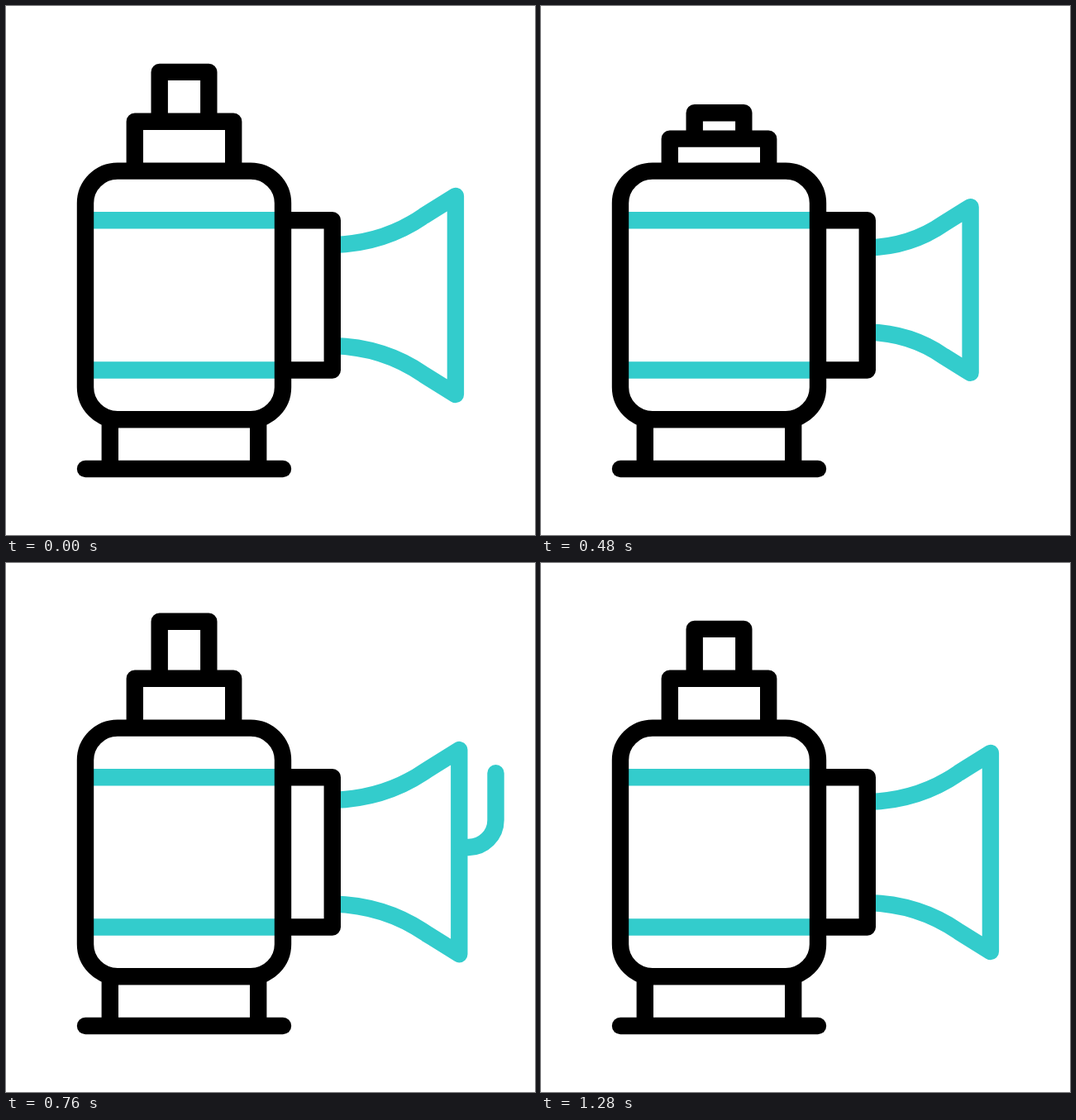
Write an HTML page that moves like this. It is 640x640 px and loops after 1480 ms.

```html
<!DOCTYPE html>
<html lang="en">
<head>
<meta charset="utf-8">
<title>Air horn</title>
<style>
  html, body { margin: 0; width: 100%; height: 100%; overflow: hidden; background: #fff; }
  svg { display: block; width: 100%; height: 100%; }
</style>
</head>
<body>
<svg viewBox="0 0 640 640" fill="none" stroke-width="20.4" stroke-linejoin="round">
  <g stroke="#33cccc">
    <path d="M96 259.2H335M96 440.5H335"/>
    <path id="horn" d="M0 -61C40 -62 77 -73 110 -96L148.5 -120V120L110 96C77 73 40 62 0 61"/>
    <path id="sound" stroke-linecap="round" d="M553 344H559.5A33 33 0 0 0 592.5 311V98A33 33 0 0 1 625.5 65H651"/>
  </g>
  <g stroke="#000">
    <path id="nozzle"/>
    <path id="collar"/>
    <rect x="96" y="199.6" width="239" height="300.6" rx="39"/>
    <path d="M335 259.2H394.8V440.5H335M125.8 500V560M305.2 500V560"/>
    <path stroke-linecap="round" d="M96 560H335"/>
  </g>
</svg>
<script>
const LOOP = 1480, STEP = 40, STROKE = 20.4;
const [horn, sound, nozzle, collar] =
  ['horn', 'sound', 'nozzle', 'collar'].map(id => document.getElementById(id));
const pathLength = sound.getTotalLength();

function ease(t, from, to) {
  const u = Math.min(1, Math.max(0, (t - from) / (to - from)));
  return u * u * (3 - 2 * u);
}

// Offset from rest: squeeze, spring past rest, settle.
function spring(t, squeeze, overshoot, settled) {
  return squeeze * ease(t, 80, 440)
    + (overshoot - squeeze) * ease(t, 440, 680)
    - overshoot * ease(t, 680, settled);
}

function draw(t) {
  const collarY = 139.8 + spring(t, 22.5, 0, 920);
  const nozzleY = 79.9 + spring(t, 55, -21.8, 824);
  collar.setAttribute('d', `M155.8 199V${collarY}H275.2V199`);
  nozzle.setAttribute('d', `M185.7 ${collarY}V${nozzleY}H245.3V${collarY}`);

  const scale = 1 + spring(t, -0.18, 0.04, 920);
  const hornY = 350 + spring(t, -7, -0.5, 920);
  horn.setAttribute('transform', `translate(395.4 ${hornY}) scale(${scale})`);
  horn.setAttribute('stroke-width', STROKE / scale);

  const head = Math.min(pathLength, 115 * (Math.max(0, t - 640) / 120) ** 1.075);
  const tail = pathLength * ease(t, 880, 1290);
  sound.style.display = t >= 640 && t < 1280 ? '' : 'none';
  sound.setAttribute('stroke-dasharray', `${Math.max(0.01, head - tail)} 999`);
  sound.setAttribute('stroke-dashoffset', -tail);
}

function tick() {
  const t = performance.now() % LOOP;
  draw(Math.floor(t / STEP) * STEP);
  requestAnimationFrame(tick);
}
tick();
</script>
</body>
</html>
```
